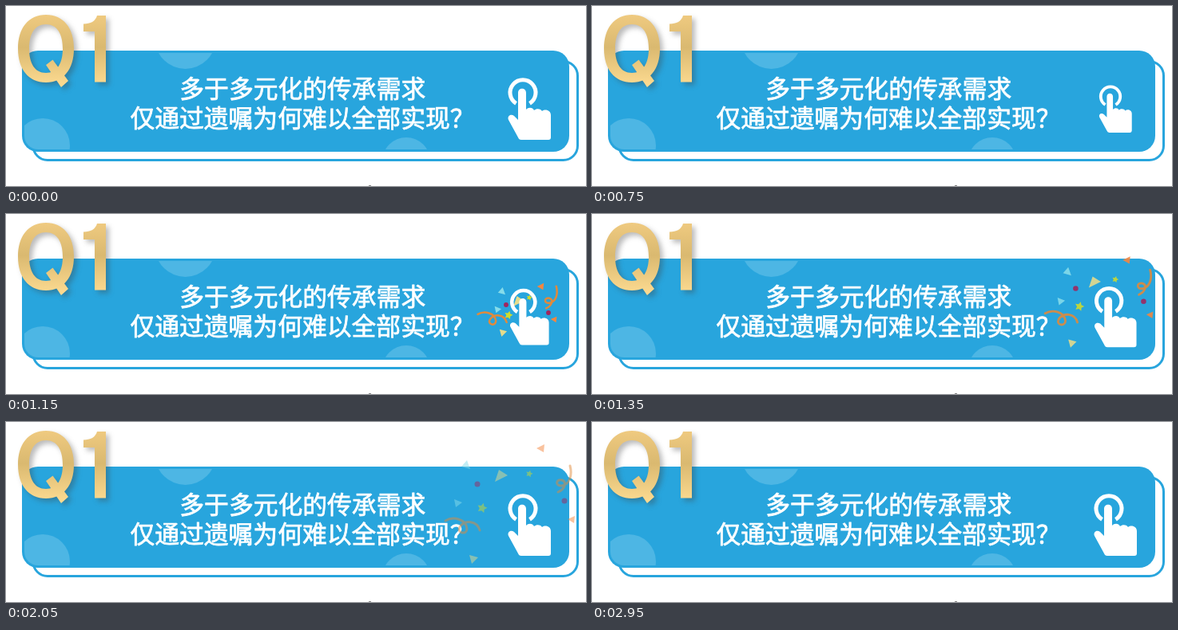
Animation of 726x226 px, one loop 3000 ms. Source, as an HTML page:

```html
<!DOCTYPE html>
<html lang="zh-CN">
<head>
<meta charset="utf-8">
<title>Q1</title>
<style>
  html, body { margin: 0; width: 100%; height: 100%; overflow: hidden; background: #fff; }
  svg { display: block; width: 726px; height: 226px; }
  .line {
    font: 500 30.8px "Noto Sans CJK SC", "Noto Sans CJK", sans-serif;
    fill: #fff; stroke: #fff; stroke-width: .75px;
  }
  .title { fill: url(#gold); filter: drop-shadow(4px 4px 3px rgba(60, 60, 60, .35)); }
</style>
</head>
<body>
<svg viewBox="0 0 726 226">
  <defs>
    <linearGradient id="gold" gradientUnits="userSpaceOnUse" x1="0" y1="11" x2="0" y2="102">
      <stop offset="0" stop-color="#efca80"/>
      <stop offset=".45" stop-color="#dab970"/>
      <stop offset="1" stop-color="#fedc92"/>
    </linearGradient>
    <clipPath id="inner"><rect x="23" y="59" width="679" height="121" rx="17"/></clipPath>
  </defs>
  <rect width="726" height="226" fill="#fff"/>
  <rect x="34" y="69.5" width="681.5" height="124" rx="18" fill="#fff" stroke="#28a5dd" stroke-width="3"/>
  <rect x="20" y="56" width="685" height="127" rx="20" fill="#28a5dd"/>
  <g clip-path="url(#inner)" fill="#4db6e4">
    <circle cx="224.5" cy="41" r="38"/>
    <circle cx="46" cy="175" r="34"/>
    <circle cx="501" cy="195" r="30"/>
  </g>
  <rect x="454" y="225" width="3" height="1" fill="#888"/>
  <g class="title" role="img" aria-label="Q1">
    <path fill-rule="evenodd" d="M50 11C72 11 85 28 85 53.5C85 79 72 96 50 96C28 96 15 79 15 53.5C15 28 28 11 50 11ZM50 23C36 23 29 35 29 53.5C29 72 36 84 50 84C64 84 71 72 71 53.5C71 35 64 23 50 23Z"/>
    <path d="M50 74L58.5 67.5L78 94L69 102Z"/>
    <path d="M125 12V95.5H111V32H97V22.5C106 22.5 112 19 114 12Z"/>
  </g>
  <text class="line" x="217.3" y="115">多于多元化的传承需求</text>
  <text class="line" x="155.4" y="152">仅通过遗嘱为何难以全部实现？</text>
  <g id="confetti"></g>
  <g id="hand" fill="#fff">
    <path d="M638.5 122.3A16 16 0 1 1 655.5 122.3" fill="none" stroke="#fff" stroke-width="5"/>
    <path d="M641 109C641 102 651 102 651 109V130C654 127 659 127 661 131C664 128 670 129 671 132C675 129 682 131 682 137V165Q682 168 679 168H645Q642 168 641 165L629 143C627 138 632 135 636 138L641 143Z"/>
  </g>
</svg>
<script>
const LOOP = 3000, STEP = 50;
const PRESS = 700, LANDED = 1500, FADE = 1150, GONE = 2950;
const MID = .5625; // flight progress at each piece's mid point
const $ = id => document.getElementById(id);

const dot = 'M-3.5 0a3.5 3.5 0 1 0 7 0a3.5 3.5 0 1 0 -7 0Z';
const star = r => 'M' + Array.from({ length: 10 }, (_, i) => {
  const a = i * Math.PI / 5 - 1.3, d = i % 2 ? r * .5 : r;
  return (d * Math.cos(a)).toFixed(2) + ' ' + (d * Math.sin(a)).toFixed(2);
}).join('L') + 'Z';

const teal = '#86dcea', sand = '#e6dc8c', orange = '#f5863f', ribbon = '#e08a3c',
  plum = '#a0265f', lime = '#cfdc2c';

// shape, colour, mid x, mid y, end x, end y, drawn as a line
const pieces = [
  ['M2 -6L-5 2L6 5Z', teal, 620, 97, 575, 54],
  ['M-4 -5L6 -1L-2 5Z', teal, 615, 120, 565, 102],
  ['M-3 -7L8 0L-8 8Z', sand, 642, 109, 620, 67],
  ['M-5 -5L6 -2L-2 6Z', sand, 622, 149, 585, 172],
  ['M-5 0L5 -5L4 5Z', orange, 669, 91, 669, 33],
  ['M-5 0L4 -4L3 5Z', orange, 686, 132, 708, 122],
  [dot, plum, 626, 114, 590, 78],
  [dot, plum, 679, 124, 699, 99],
  [star(6.5), lime, 629, 127, 596, 108],
  [star(4.5), lime, 655, 105, 655, 65],
  ['M-22 -6C-12 -12 4 -8 5 4C5 12 -8 10 -4 2C2 -8 18 -6 21 6', ribbon, 609, 131, 572, 130, true],
  ['M8 -17C11 -6 8 6 -2 8C-11 9 -10 -1 -2 1C4 3 2 12 -7 16', ribbon, 682, 105, 698, 72, true]
].map(([d, color, mx, my, ex, ey, line]) => {
  const el = document.createElementNS('http://www.w3.org/2000/svg', 'path');
  el.setAttribute('d', d);
  el.setAttribute('fill', line ? 'none' : color);
  if (line) {
    el.setAttribute('stroke', color);
    el.setAttribute('stroke-width', 3);
    el.setAttribute('stroke-linecap', 'round');
  }
  $('confetti').append(el);
  return { el, mx, my, ex, ey };
});

const clamp = v => Math.max(0, Math.min(1, v));

function draw(t) {
  const press = clamp(1 - Math.abs(t - PRESS) / PRESS);
  const s = 1 - .255 * press;
  $('hand').setAttribute('transform', `translate(655.5 129.5) scale(${s}) translate(-655.5 -129.5)`);

  const p = clamp((t - PRESS) / (LANDED - PRESS));
  const back = (1 - p) / (1 - MID);
  const fade = 1 - clamp((t - FADE) / (GONE - FADE));
  $('confetti').setAttribute('opacity', clamp((p - .07) * 4) * fade);
  for (const { el, mx, my, ex, ey } of pieces) {
    const x = ex + (mx - ex) * back, y = ey + (my - ey) * back;
    el.setAttribute('transform', `translate(${x} ${y}) scale(${p ** .3})`);
  }
}

const start = performance.now();
function tick() {
  const t = (performance.now() - start) % LOOP;
  draw(Math.floor(t / STEP) * STEP);
  requestAnimationFrame(tick);
}
draw(0);
requestAnimationFrame(tick);
</script>
</body>
</html>
```
